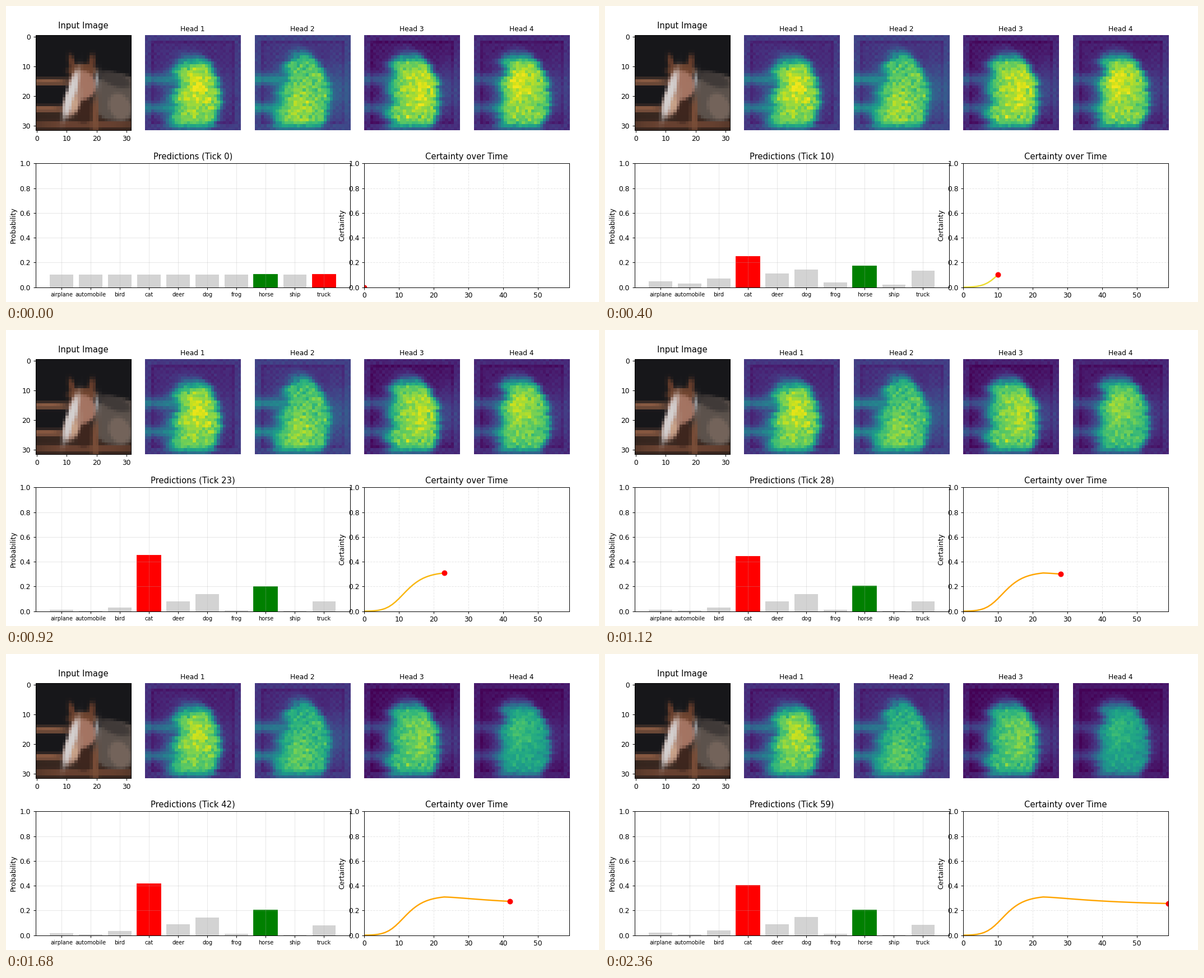
Write a matplotlib script that moves like this. It is 1058x529 px and loops after 2400 ms.

```python
import numpy as np
import matplotlib.pyplot as plt
from matplotlib.animation import FuncAnimation
from matplotlib.colors import to_rgb

FRAMES = 60
TICKS = np.arange(FRAMES)
N = 32  # cells per side of each picture
Y, X = np.mgrid[0:N, 0:N] + 0.5


def step(d, soft=1.0):
    """Smooth 0..1 step over a signed distance."""
    return 1 / (1 + np.exp(np.clip(-d / soft, -50, 50)))


def shape(cx, cy, rx, ry, tilt=0.0, power=2):
    """Soft superellipse: power 2 is an ellipse, a high power is a box."""
    dx, dy = X - cx, Y - cy
    u = dx * np.cos(tilt) + dy * np.sin(tilt)
    v = dy * np.cos(tilt) - dx * np.sin(tilt)
    r = (np.abs(u / rx) ** power + np.abs(v / ry) ** power) ** (1 / power)
    return step((1 - r) * min(rx, ry), 0.22)


def glow(cx, cy, rx, ry):
    return np.exp(-((X - cx) / rx) ** 2 - ((Y - cy) / ry) ** 2)


# ---- input picture: a few flat shapes on a coarse grid ----
def picture():
    layers = [
        ("#37261f", shape(16, 30, 17, 4.2, power=10)),        # ground
        ("#8c5d44", shape(4, 15.7, 6.5, 1, power=10)),        # rails
        ("#8a5a42", shape(3, 24.8, 6.5, 1, power=10)),
        ("#6f4533", shape(16, 30, 17, 0.9, power=10)),
        ("#5c524c", shape(27, 21, 7.5, 7.8, 0.1, 2.6)),       # body
        ("#403a38", shape(26.5, 15, 5.5, 2.2, 0.35)),
        ("#74645b", shape(28, 24, 3.5, 4.5, -0.4)),
        ("#3e261e", shape(16, 25, 2.8, 4.5)),                 # shadow
        ("#7a4e38", shape(19.8, 27, 1.1, 5.5, power=10)),     # post
        ("#683e2c", shape(12, 9.2, 1, 2.4, -0.2)),            # ears
        ("#683e2c", shape(18.7, 9.2, 1, 2.4, 0.1)),
        ("#704530", shape(15.6, 12.2, 4.8, 2.4)),             # face
        ("#a47462", shape(15.5, 17, 4.6, 4.8)),
        ("#a88070", shape(12.4, 22, 2.8, 5.6, 0.3)),
        ("#d4d0d0", shape(11.8, 20, 1.5, 8, 0.28)),           # blaze
        ("#cca68c", shape(13, 23.3, 0.9, 2.4, 0.1)),
        ("#a0a0a2", shape(20.4, 15, 0.6, 2, power=6)),
    ]
    img = np.ones((N, N, 3)) * to_rgb("#17171a")
    for color, mask in layers:
        img += (np.array(to_rgb(color)) - img) * mask[..., None]
    return img


# ---- attention maps ----
def head_map(seed, top, left, lean, floor, level, rails, side, peak):
    rng = np.random.default_rng(seed)

    ring = np.minimum(np.minimum(X, N - X), np.minimum(Y, N - Y)).astype(int)
    checker = np.cos(np.pi * (X + Y - 1))
    back = floor + 0.012 * checker + rng.normal(0, 0.01, (N, N))
    back += 0.05 * (ring < 2) - 0.03 * (ring == 2)
    back += side * glow(28, 19, 4, 9) + 0.12 * glow(8, 22, 3, 10)
    for y in (15, 24.5):
        back += rails * step(11 - X, 1.5) * np.exp(-((Y - y) / 1.8) ** 2)

    # widest on the right around row 21, leaning to the left below
    edge_l = left - lean * (Y - 18) / 10 + 0.8 * np.sin(0.8 * Y + seed)
    edge_r = 25.4 - 0.03 * (Y - 21) ** 2
    jitter = rng.normal(0, 0.35, (2, N, 1))
    mask = (step(X - edge_l + jitter[0], 0.9) * step(edge_r - X + jitter[1], 0.6)
            * step(Y - top, 0.9) * step(31 - Y, 0.7))

    body = level + rng.normal(0, 0.05, (N, N))
    body += 0.14 * glow(*peak, 5, 7) - 0.22 * glow(14, top, 9, 2.5)
    return np.clip(back + (body - back) * mask, 0, 0.98)


HEADS = [
    head_map(1, 7.5, 9.8, 1.0, 0.12, 0.79, 0.26, 0.04, (17.5, 18)),
    head_map(2, 5.5, 9.2, 2.0, 0.15, 0.74, 0.30, 0.14, (15, 24)),
    head_map(3, 6.5, 9.0, 0.8, 0.06, 0.80, 0.20, 0.16, (19, 19)),
    head_map(4, 6.5, 9.2, 0.6, 0.08, 0.80, 0.18, 0.11, (15, 17)),
]
FADES = (0.03, 0.10, 0.11, 0.27)
u = np.clip((TICKS - 12) / 38, 0, 1)
DECAY = u * u * (3 - 2 * u)

# ---- predictions: a softmax that sharpens, then relaxes a little ----
PEAKS = {"airplane": 0.012, "automobile": 0.004, "bird": 0.028, "cat": 0.46,
         "deer": 0.077, "dog": 0.137, "frog": 0.008, "horse": 0.2,
         "ship": 0.002, "truck": 0.068}
NAMES = list(PEAKS)
TRUE = NAMES.index("horse")


def predictions():
    rise = step(TICKS - 10.3, 3.4)
    rise = (rise - rise[0]) / (1 - rise[0])
    rise *= 0.8 + 0.2 * np.exp(-np.maximum(TICKS - 23, 0) / 20)
    logits = np.outer(np.log(10 * np.array(list(PEAKS.values()))), rise)
    logits[NAMES.index("truck")] += 0.03 + 0.24 * TICKS / 8 * np.exp(1 - TICKS / 8)
    p = np.exp(logits)
    return p / p.sum(axis=0)


PROBS = predictions()
# certainty is one minus the normalised entropy
CERTAINTY = 1 + (PROBS * np.log(PROBS)).sum(axis=0) / np.log(len(NAMES))
warm = np.clip((TICKS - 15) / 12, 0, 1)[:, None]
LINE_RGB = (1 - warm) * to_rgb("#ecdc30") + warm * to_rgb("orange")

# ---- layout ----
fig = plt.figure(figsize=(12, 6), dpi=88.16667)
gs = fig.add_gridspec(2, 5, height_ratios=[1, 1.3], left=0.0497, right=0.9497,
                      top=0.9012, bottom=0.05, wspace=0.15, hspace=0.3)

ax_in = fig.add_subplot(gs[0, 0])
ax_in.imshow(picture(), interpolation="nearest")
ax_in.set_title("Input Image", pad=10)

maps = []
for i, head in enumerate(HEADS):
    ax = fig.add_subplot(gs[0, i + 1])
    maps.append(ax.imshow(head, cmap="viridis", vmin=0, vmax=1, interpolation="nearest"))
    ax.set_title(f"Head {i + 1}", fontsize=10)
    ax.axis("off")

ax_bar = fig.add_subplot(gs[1, :3])
bars = ax_bar.bar(NAMES, PROBS[:, 0])
ax_bar.set(ylim=(0, 1), ylabel="Probability")
ax_bar.tick_params(axis="x", labelsize=8)
ax_bar.grid(True, alpha=0.3)
title = ax_bar.set_title("Predictions (Tick 0)")

ax_line = fig.add_subplot(gs[1, 3:])
line, = ax_line.plot([], [], lw=2)
dot, = ax_line.plot([], [], "o", color="red", ms=7.1)
ax_line.set(xlim=(0, FRAMES - 1), ylim=(0, 1), title="Certainty over Time",
            xlabel="Tick", ylabel="Certainty")
ax_line.grid(True, linestyle="--", alpha=0.3)


def update(t):
    for im, head, fade in zip(maps, HEADS, FADES):
        im.set_data(np.clip(head * (1 - fade * DECAY[t]) - 0.03 * DECAY[t], 0, 1))
    best = PROBS[:, t].argmax()
    for i, bar in enumerate(bars):
        mark = "red" if i == best else "green" if i == TRUE else None
        bar.set(height=PROBS[i, t], facecolor=mark or "lightgray",
                edgecolor=mark or "none", linewidth=1.5)
    title.set_text(f"Predictions (Tick {t})")
    line.set_data(TICKS[:t + 1], CERTAINTY[:t + 1])
    line.set_color(LINE_RGB[t])
    dot.set_data([t], [CERTAINTY[t]])
    return [*maps, *bars, title, line, dot]


anim = FuncAnimation(fig, update, frames=FRAMES, interval=40, repeat=True, repeat_delay=0)
plt.show()
```
